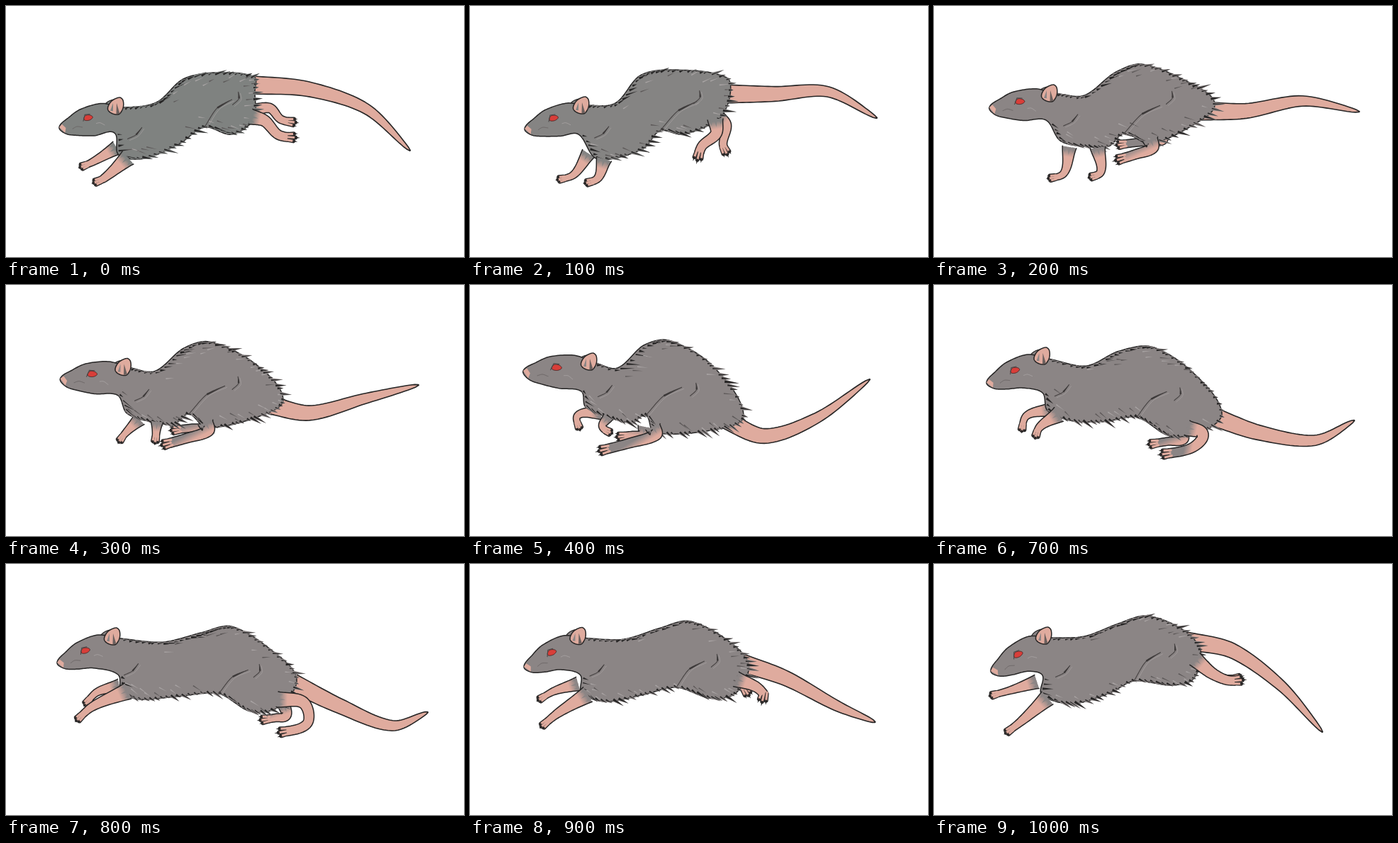
Recreate the animation shown at these times as an HTML page with a canvas. Size 646 px wide and 354 px high, loop 1100 ms.

```html
<!DOCTYPE html>
<html lang="en">
<head>
<meta charset="utf-8">
<title>Running rat</title>
<style>
html, body { margin: 0; width: 100%; height: 100%; overflow: hidden; background: #fff; }
canvas { display: block; }
</style>
</head>
<body>
<canvas id="stage" width="646" height="354"></canvas>
<script>
const ctx = document.getElementById('stage').getContext('2d');
const STEP = 100, STEPS = 11, SUB = 14;
const SKIN = '#dfab9e', INK = '#262525';

// Joints of the gallop as x,y pairs; shapes and widths follow by rule.
// head: nose, ear. torso: nape, dip, rise, top, rump, tail root, haunch, knee, groin, belly, armpit, chest, throat.
const poses = [
  { at: 0, head: [75,171, 155,142], tail: [338,111, 425,117, 508,145, 570,204],
    torso: [165,143, 212,136, 250,103, 295,94, 350,100, 351,120, 349,160, 318,181, 280,171, 245,194, 195,215, 159,210, 153,179],
    fore: [172,214, 138,243, 120,251], foreFar: [156,200, 122,220, 101,229],
    hind: [345,156, 365,162, 385,182, 416,186], hindFar: [345,148, 372,144, 388,160, 414,165] },
  { at: 1, head: [77,173, 157,141], tail: [360,124, 430,124, 505,121, 574,158],
    torso: [165,140, 205,137, 240,98, 285,90, 362,101, 366,130, 350,160, 300,181, 268,176, 246,200, 203,215, 176,214, 153,181],
    fore: [189,216, 180,243, 158,251], foreFar: [167,208, 146,238, 119,246],
    hind: [346,160, 347,180, 327,198, 319,224], hindFar: [350,155, 362,168, 357,195, 365,214] },
  { at: 2, head: [78,143, 163,124], tail: [378,148, 440,148, 520,134, 600,149],
    torso: [172,123, 212,126, 255,94, 293,82, 360,108, 396,138, 365,168, 305,194, 268,180, 246,198, 210,198, 178,190, 158,161],
    fore: [231,200, 235,234, 215,243], foreFar: [191,199, 183,236, 157,244],
    hind: [305,188, 308,200, 285,209, 249,220], hindFar: [318,178, 322,189, 290,192, 251,197] },
  { at: 4, head: [75,121, 168,109], tail: [355,187, 415,213, 490,187, 564,133],
    torso: [178,110, 208,117, 245,85, 280,78, 340,112, 386,184, 345,204, 260,208, 248,184, 228,194, 200,188, 163,172, 157,150],
    fore: [195,186, 187,200, 204,211], foreFar: [185,180, 152,184, 156,207],
    hind: [258,200, 262,211, 225,223, 175,236], hindFar: [246,200, 243,211, 228,212, 202,215] },
  { at: 6, head: [76,136, 155,99], tail: [382,203, 445,216, 530,210, 591,173],
    torso: [165,104, 208,118, 245,90, 295,86, 350,120, 402,198, 365,215, 318,217, 272,190, 242,198, 200,192, 157,174, 148,148],
    fore: [180,186, 176,200, 187,216], foreFar: [170,179, 133,188, 138,218],
    hind: [331,212, 338,226, 300,235, 250,241], hindFar: [306,214, 308,222, 280,224, 238,231] },
  { at: 8, head: [72,139, 150,103], tail: [405,168, 470,200, 545,228, 595,209],
    torso: [162,105, 222,110, 275,97, 318,88, 375,122, 410,162, 384,202, 345,208, 300,183, 240,187, 188,191, 163,180, 158,156],
    fore: [172,179, 122,201, 96,224], foreFar: [160,172, 128,181, 108,203],
    hind: [383,191, 420,196, 424,226, 378,239], hindFar: [392,198, 395,214, 380,217, 353,221] },
  { at: 10, head: [80,151, 155,102], tail: [352,108, 420,122, 490,172, 548,237],
    torso: [165,104, 212,102, 260,84, 300,73, 350,92, 376,122, 366,162, 335,171, 282,165, 248,182, 195,197, 152,184, 153,157],
    fore: [160,189, 124,221, 98,241], foreFar: [145,166, 108,178, 75,187],
    hind: [368,134, 392,154, 415,164, 443,163], hindFar: [366,134, 390,152, 412,162, 440,160] }
];

const mix = (a, b, k) => [a[0] + (b[0] - a[0]) * k, a[1] + (b[1] - a[1]) * k];
const add = (p, d, k = 1) => [p[0] + d[0] * k, p[1] + d[1] * k];
const sub = (a, b) => [a[0] - b[0], a[1] - b[1]];
const unit = v => { const d = Math.hypot(...v) || 1; return [v[0] / d, v[1] / d]; };
const dist = (a, b) => Math.hypot(a[0] - b[0], a[1] - b[1]);
const turn = ([x, y], a) => [x * Math.cos(a) - y * Math.sin(a), x * Math.sin(a) + y * Math.cos(a)];
const pairs = list => list.filter((v, i) => i % 2 === 0).map((x, i) => [x, list[2 * i + 1]]);

function poseAt(step) {
  const i = poses.findIndex(p => p.at >= step), b = poses[i], a = poses[Math.max(0, i - 1)];
  const k = a === b ? 1 : (step - a.at) / (b.at - a.at), out = {};
  for (const key in b) {
    if (key !== 'at') out[key] = pairs(b[key]).map((q, j) => mix(pairs(a[key])[j], q, k));
  }
  return out;
}

// Hermite spline whose tangents scale with each chord, so short spans never loop.
function curve(p, closed) {
  const n = p.length, out = [];
  const at = i => closed ? p[(i + n) % n] : p[Math.max(0, Math.min(n - 1, i))];
  for (let i = 0; i < (closed ? n : n - 1); i++) {
    const b = at(i), c = at(i + 1), len = dist(b, c) * 0.9;
    const m = unit(sub(c, at(i - 1))), w = unit(sub(at(i + 2), b));
    for (let s = 0; s < SUB; s++) {
      const u = s / SUB, v = 1 - u;
      const q = mix(b, c, u * u * (3 - 2 * u));
      out.push(add(add(q, m, len * u * v * v), w, -len * u * u * v));
    }
  }
  if (!closed) out.push(p[n - 1]);
  return out;
}

function trace(pts) {
  ctx.beginPath();
  pts.forEach(([x, y]) => ctx.lineTo(x, y));
}

function line(pts, width, color = INK) {
  trace(pts);
  ctx.lineWidth = width;
  ctx.strokeStyle = color;
  ctx.stroke();
}

function fill(pts, color) {
  trace(pts);
  ctx.fillStyle = color;
  ctx.fill();
}

// Tapered stroke, wide at a and pointed at b.
function spike(a, b, width, color = INK) {
  const [x, y] = unit(sub(b, a)), side = [-y, x];
  fill([add(a, side, width / 2), b, add(a, side, -width / 2)], color);
}

// Outline around a centre line; half(u) is the half width along it.
function tube(mid, half) {
  const n = mid.length - 1, left = [], right = [];
  mid.forEach((p, i) => {
    const [x, y] = unit(sub(mid[Math.min(n, i + 1)], mid[Math.max(0, i - 1)]));
    const h = half(i / n);
    left.push(add(p, [y, -x], h));
    right.unshift(add(p, [y, -x], -h));
  });
  return left.concat(right);
}

function tail(joints) {
  const shape = tube(curve(joints), u => 12.5 * (1 - u) ** 0.55 + 0.4);
  fill(shape, SKIN);
  line(shape, 1.6);
}

function limb(joints, fur, wide, narrow, toe) {
  const mid = curve(joints), tip = mid[mid.length - 1], root = mid[0];
  const shin = mid.filter(p => dist(p, tip) > toe), paw = shin[shin.length - 1];
  const dir = unit(sub(tip, paw)), out = unit(sub(shin[SUB / 2], root));
  const base = Math.min(wide, 3 + dist(root, tip) * 0.17);
  const shape = tube(shin, u => narrow + (base - narrow) * (1 - u) ** 2);
  const toes = [-0.4, 0, 0.4].map(a => {
    const d = turn(dir, a);
    return [add(paw, [-d[1], d[0]], a * narrow * 1.6), add(paw, d, toe * (1 - Math.abs(a) * 0.3))];
  });

  toes.forEach(([a, b]) => line([a, mix(a, b, 0.6)], 6));
  const g = ctx.createLinearGradient(...root, ...add(root, out, 14));
  g.addColorStop(0.2, fur);
  g.addColorStop(1, SKIN);
  fill(shape, g);
  line(shape, 1.5);
  toes.forEach(([a, b]) => {
    line([add(a, dir, -2), mix(a, b, 0.6)], 3.2, SKIN);
    spike(mix(a, b, 0.55), b, 3.5);
  });
  for (let i = -1; i <= 1; i++) {
    const a = add(root, [-out[1], out[0]], i * base * 0.6);
    spike(a, add(a, out, 11 - 3 * Math.abs(i)), 4, fur);
  }
}

function coat(body, fur, flow, rnd) {
  let walked = 0;
  for (let i = 4 * SUB; i < 16 * SUB; i++) {
    const p = body[i], next = body[i + 1];
    walked += dist(p, next);
    if (walked < 4) continue;
    walked = -rnd() * 4;
    const [tx, ty] = unit(sub(next, p)), out = [ty, -tx];
    const neck = i < 5 * SUB, len = neck ? 4 + rnd() * 5 : 6 + rnd() ** 2 * 15;
    const dir = unit(add(flow, out, 0.25 + rnd() * 0.3));
    const a = add(p, out, -2.5), b = add(a, dir, len);
    spike(a, b, 6, fur);
    spike(a, b, 1.4 + rnd() * 2.2);
    if (!neck && rnd() < 0.4) {
      const inner = add(p, out, -5 - rnd() * 12);
      spike(inner, add(inner, dir, 8 + rnd() * 8), 1.6, rnd() < 0.5 ? '#5b5757' : '#aaa5a5');
    }
  }
}

function folds([nape, , , top, rump, , haunch, , groin, , armpit]) {
  const hip = mix(groin, rump, 0.55), hollow = mix(top, haunch, 0.55), shoulder = mix(armpit, nape, 0.48);
  const strokes = [
    [hip, add(mix(hip, groin, 0.4), [-5, -4]), groin],
    [add(hollow, [3, -9]), add(hollow, [4, 0]), add(hollow, [-5, 9])],
    [add(shoulder, [11, -9]), add(shoulder, [3, 1]), add(shoulder, [-9, 7])]
  ];
  for (const s of strokes) {
    const c = curve(s);
    line(c.map(p => add(p, [3, 2])), 0.9, '#a49f9f');
    line(c, 1.2, '#4a4646');
    spike(c[SUB], c[0], 2.6, '#3b3838');
  }
}

const EAR = [[-11, 5], [-7, -7], [5, -13], [10, -9], [10, 2], [3, 11]];

function draw(step) {
  const p = poseAt(step), k = Math.min(1, step / 2);
  const fur = `rgb(${[127 + 12 * k, 130 + 3 * k, 128 + 5 * k].map(Math.round)})`;
  let seed = step * 7919 + 17;
  const rnd = () => (seed = (seed * 16807) % 2147483647) / 2147483647;

  // Head frame: x from nose to ear, y towards the jaw.
  const [nose, ear] = p.head, axis = sub(ear, nose);
  const face = (x, y) => add(add(nose, axis, x), [-axis[1], axis[0]], y);
  const body = curve([
    nose, face(0.21, -0.1), face(0.43, -0.16), face(0.8, -0.13),
    ...p.torso,
    face(0.5, 0.33), face(0.25, 0.235), face(0.07, 0.14)
  ], true);

  ctx.fillStyle = '#fff';
  ctx.fillRect(0, 0, 646, 354);
  tail(p.tail);
  limb(p.hindFar, fur, 9, 5.5, 15);
  limb(p.foreFar, fur, 10, 4.5, 11);

  const earAt = (dx, dy) => curve(EAR.map(o => add(add(ear, o), [dx, dy])), true);
  fill(earAt(-8, 3), fur);
  line(earAt(-8, 3), 1.2);
  fill(body, fur);
  line(body.concat([body[0]]), 1.5);
  coat(body, fur, unit(sub(p.torso[5], p.torso[1])), rnd);
  folds(p.torso);
  limb(p.hind, fur, 11, 6.5, 17);
  limb(p.fore, fur, 12, 5, 11);

  fill([nose, face(0.06, -0.03), face(0.1, 0.05), face(0.06, 0.12)], SKIN);
  fill(earAt(0, 0), SKIN);
  line(earAt(0, 0), 1.5);
  spike(add(ear, [3, 10]), add(ear, [1, -5]), 5, '#6b605e');
  spike(add(ear, [-6, 6]), add(ear, [-4, -5]), 4, fur);

  const eye = curve([face(0.43, 0.02), face(0.49, -0.035), face(0.58, 0.025), face(0.51, 0.06)], true);
  fill(eye, '#d83e39');
  line(eye, 1, '#4a2a2a');
  line([face(0.41, 0.04), face(0.47, -0.05), face(0.55, -0.03)], 1.1, '#4b4747');
  line(curve([face(0.2, 0.1), face(0.28, 0.09), face(0.36, 0.13)]), 0.9, '#686363');
  line(curve([face(0.6, 0.15), face(0.66, 0.16), face(0.72, 0.22)]), 1, '#aaa5a5');
}

ctx.lineJoin = ctx.lineCap = 'round';
let shown = -1;
const start = performance.now();
function tick() {
  const step = Math.floor((performance.now() - start) / STEP) % STEPS;
  if (step !== shown) draw(shown = step);
  requestAnimationFrame(tick);
}
tick();
</script>
</body>
</html>
```
